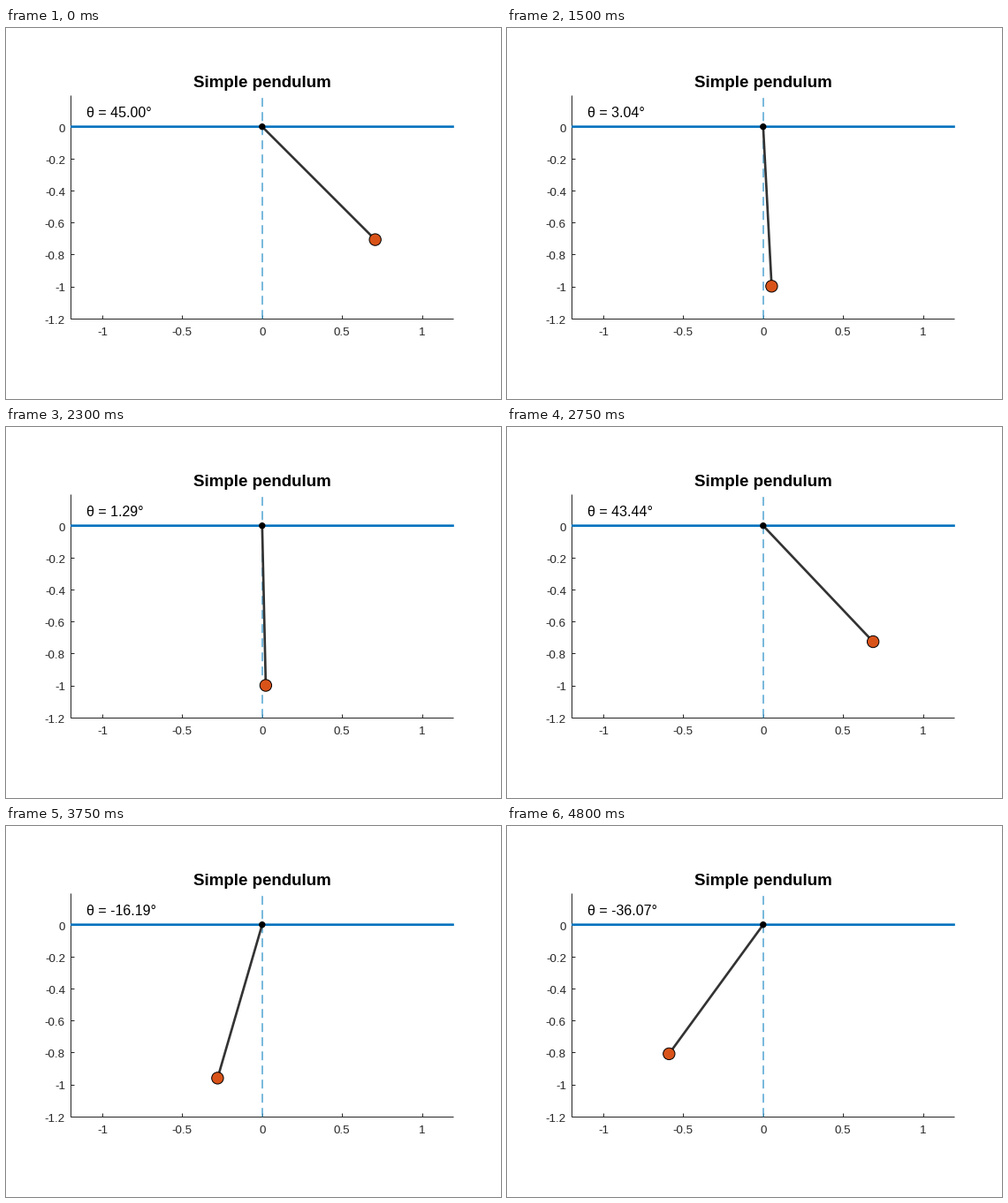
A matplotlib script for the animation above (4850 ms loop, 560 px wide and 420 px high).

```python
import matplotlib.pyplot as plt
import numpy as np
from matplotlib.animation import FuncAnimation
from matplotlib.patches import Circle

W, H, DPI = 560, 420, 100
PT = 72 / DPI                      # points per pixel
SCALE = 434 / 2.4                  # pixels per data unit
X0, Y0 = 289.8, 111.73             # pivot on the stage
LEFT, RIGHT, TOP, BOTTOM = 73, 506, 76, 329
INK = "#262626"
BLUE = "#0072BD"
G, LENGTH, T_END = 9.81, 1.0, 5.0

# Dormand-Prince 5(4) coefficients
A = [
    [1/5],
    [3/40, 9/40],
    [44/45, -56/15, 32/9],
    [19372/6561, -25360/2187, 64448/6561, -212/729],
    [9017/3168, -355/33, 46732/5247, 49/176, -5103/18656],
    [35/384, 0, 500/1113, 125/192, -2187/6784, 11/84],
]
E = np.array([71/57600, 0, -71/16695, 71/1920, -17253/339200, 22/525, -1/40])
DENSE = np.array([
    [1, -183/64, 37/12, -145/128],
    [0, 0, 0, 0],
    [0, 1500/371, -1000/159, 1000/371],
    [0, -125/32, 125/12, -375/64],
    [0, 9477/3392, -729/106, 25515/6784],
    [0, -11/7, 11/3, -55/28],
    [0, 3/2, -4, 5/2],
])


def swing(y):
    return np.array([y[1], -G / LENGTH * np.sin(y[0])])


def solve(y, t_end, rtol=1e-3, atol=1e-6, refine=4):
    """Angles at the adaptive steps, with refine outputs per step."""
    floor, power, h_max = atol / rtol, 1/5, 0.1 * t_end
    slope = swing(y)
    rate = np.max(np.abs(slope) / np.maximum(np.abs(y), floor))
    h = min(h_max, 0.8 * rtol**power / rate)
    t, angles, done = 0.0, [y[0]], False
    while not done:
        h, failed = min(h, h_max), False
        if 1.1 * h >= t_end - t:
            h, done = t_end - t, True
        while True:
            k = [slope]
            for row in A:
                new = y + h * sum(a * s for a, s in zip(row, k))
                k.append(swing(new))
            k = np.array(k)
            size = np.maximum(np.maximum(np.abs(y), np.abs(new)), floor)
            err = h * np.max(np.abs(E @ k) / size)
            if err <= rtol:
                break
            h *= 0.5 if failed else max(0.1, 0.8 * (rtol / err)**power)
            failed, done = True, False
        for s in np.arange(1, refine) / refine:
            mid = y + h * (DENSE @ s**np.arange(1, 5)) @ k
            angles.append(mid[0])
        angles.append(new[0])
        t, y, slope = t + h, new, k[-1]
        if not failed:
            h /= max(0.2, 1.25 * (err / rtol)**power)
    return np.array(angles)


angles = solve(np.array([np.pi / 4, 0.0]), T_END)

fig = plt.figure(figsize=(W / DPI, H / DPI), dpi=DPI, facecolor="white")
ax = fig.add_axes([0, 0, 1, 1])
ax.set_xlim(0, W)
ax.set_ylim(H, 0)
ax.axis("off")


def line(xs, ys, color, width, **kw):
    return ax.plot(xs, ys, color=color, lw=width * PT,
                   solid_capstyle="butt", **kw)[0]


def disc(x, y, r, color, edge):
    return ax.add_patch(Circle((x, y), r, fc=color, ec="black",
                               lw=edge * PT, zorder=3))


def label(x, y, text, px, ha="center", color=INK, **kw):
    return ax.text(x, y, text, fontsize=px * PT, ha=ha, va="baseline",
                   color=color, family="Liberation Sans", **kw)


# axes, ticks and their labels
line([LEFT, LEFT], [TOP, BOTTOM], INK, 1)
line([LEFT, RIGHT], [BOTTOM, BOTTOM], INK, 1)
for i in range(-2, 3):
    x = X0 + i / 2 * SCALE
    line([x, x], [BOTTOM, BOTTOM - 4], INK, 1)
    label(x, 348, f"{i / 2:g}", 13.33)
for i in range(-6, 1):
    y = Y0 - i / 5 * SCALE
    line([LEFT, LEFT + 4], [y, y], INK, 1)
    label(67, y + 5.9, f"{i / 5:g}", 13.33, ha="right")
label(290.2, 67, "Simple pendulum", 18.8, color="black", weight="bold")

# support and plumb line
line([LEFT, RIGHT + 0.8], [Y0, Y0], BLUE, 2.67, snap=False)
plumb = 1.5
line([290, 290], [329.2, TOP], "#4FA3D1", plumb, snap=False,
     ls=(0, (10 / plumb, 6 / plumb)))

# moving parts
rod = line([], [], "#333333", 2.67)
disc(X0, Y0, 3.7, "black", 0)
bob = disc(X0, Y0, 6.67, "#D95319", 1)
reading = label(91, 101, "", 16, ha="left", color="black")


def draw(i):
    a = angles[i]
    x = X0 + LENGTH * SCALE * np.sin(a)
    y = Y0 + LENGTH * SCALE * np.cos(a)
    rod.set_data([X0, x], [Y0, y])
    bob.center = x, y
    reading.set_text(f"θ = {np.degrees(a):.2f}°")
    return rod, bob, reading


anim = FuncAnimation(fig, draw, frames=len(angles), interval=50, repeat=True,
                     repeat_delay=0, init_func=lambda: draw(0))
plt.show()
```
